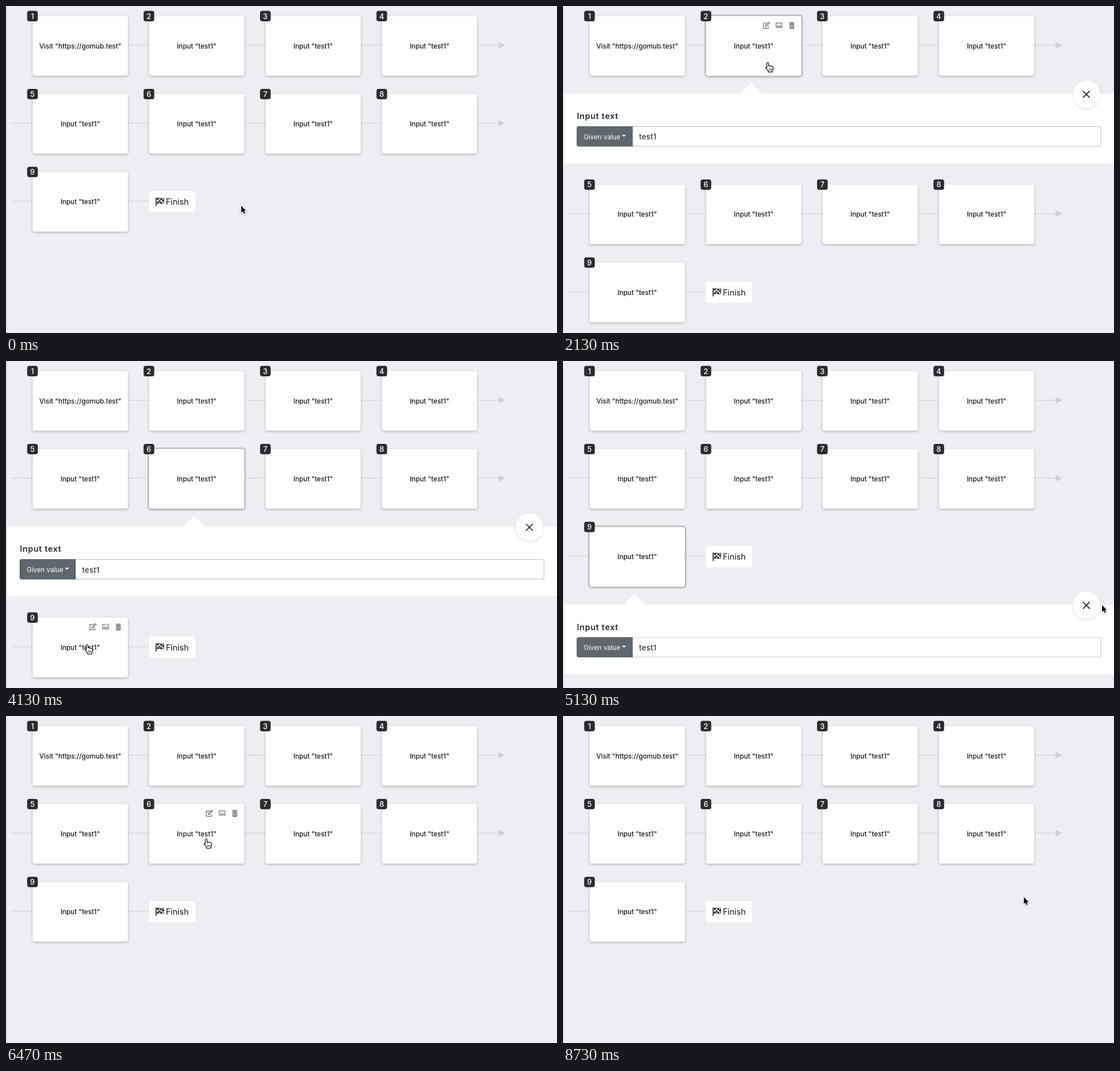
An HTML page with a canvas for the animation above (8.76 s loop, 972x576 px).

```html
<!DOCTYPE html>
<html lang="en">
<head>
<meta charset="utf-8">
<title>Step editor</title>
<style>
html, body { margin: 0; width: 972px; height: 576px; overflow: hidden; }
canvas { display: block; }
</style>
</head>
<body>
<canvas width="972" height="576"></canvas>
<script>
const ctx = document.querySelector('canvas').getContext('2d');
const LOOP = 8760, CLICK_DELAY = 200, CLOSED = -1;
const CARD_W = 168, CARD_H = 105, PITCH_X = 205.4, PITCH_Y = 137.3;
const PANEL_H = 123, PANEL_SHIFT = 159.5;
const INK = '#17181a', LINE = '#cfd0d3', ICON = '#6c6e71';
const FONT = 'Inter, "Open Sans", sans-serif';

// Pointer trips; `opens` is the card shown by the click that follows the trip.
const home = { x: 415, y: 352 };
const trips = [
  { start: 230, end: 530, x: 383, y: 331 },
  { start: 730, end: 1430, x: 346, y: 76, opens: 1 },
  { start: 1930, end: 2800, x: 330, y: 362, bend: 53, opens: 5 },
  { start: 3030, end: 4000, x: 143, y: 500, opens: 8 },
  { start: 4400, end: 5050, x: 951, y: 430 },
  { start: 5150, end: 5230, x: 932, y: 434, opens: CLOSED },
  { start: 5440, end: 6330, x: 353, y: 217, opens: 5 },
  { start: 6750, end: 7600, x: 922, y: 303, opens: CLOSED },
  { start: 7830, end: 8180, x: 751, y: 318 },
  { start: 8470, end: 8730, x: 813, y: 319 }
];

const arrow = new Path2D('M0 0V12L2.7 9.4L4.6 13.8L6.6 13L4.8 8.7H8.5Z');
const hand = new Path2D('M-1.4 8.5V1a1.5 1.5 0 0 1 3 0V5.5q1.6-1 2.9.3q1.9-.8 2.7.6q2.4-.2 2.4 1.8V11q0 1.6-1.5 3V16H1V14.2q-2.2-2.6-4.2-5.2q-.6-2 1.8-.5z');
const ease = u => u * u * u * (10 - 15 * u + 6 * u * u);

function pointerAt(t) {
  const i = trips.findLastIndex(trip => trip.start <= t);
  if (i < 0) return [home.x, home.y];
  const from = trips[i - 1] ?? home, to = trips[i];
  const s = ease(Math.min(1, (t - to.start) / (to.end - to.start)));
  const bulge = 4 * s * (1 - s) * (to.bend ?? 0);
  return [from.x + (to.x - from.x) * s + bulge, from.y + (to.y - from.y) * s];
}

function openCardAt(t) {
  const click = trips.findLast(trip => 'opens' in trip && trip.end + CLICK_DELAY <= t);
  return click ? click.opens : CLOSED;
}

function box(x, y, w, h, r, fill) {
  ctx.beginPath();
  ctx.roundRect(x, y, w, h, r);
  ctx.fillStyle = fill;
  ctx.fill();
}

function triangle(x, y, dx, dy, fill) {
  // Apex at x, y; the base lies dx, dy away and is perpendicular to the axis of the larger offset.
  ctx.beginPath();
  ctx.moveTo(x, y);
  ctx.lineTo(x + dx, y + dy);
  Math.abs(dx) > Math.abs(dy) && dx < 0 ? ctx.lineTo(x + dx, y - dy) : ctx.lineTo(x - dx, y + dy);
  ctx.fillStyle = fill;
  ctx.fill();
}

function text(str, x, y, size, color, { weight = 400, align = 'left', gap = 0 } = {}) {
  ctx.font = `${weight} ${size}px ${FONT}`;
  ctx.textAlign = align;
  ctx.letterSpacing = gap + 'px';
  ctx.fillStyle = color;
  ctx.fillText(str, x, y);
}

function stroke(path, color, width) {
  ctx.strokeStyle = color;
  ctx.lineWidth = width;
  ctx.stroke(typeof path === 'string' ? new Path2D(path) : path);
}

function at(x, y, draw) {
  ctx.save();
  ctx.translate(x, y);
  draw();
  ctx.restore();
}

function withShadow(draw, alpha = .26) {
  ctx.save();
  ctx.shadowColor = `rgba(0,0,0,${alpha})`;
  ctx.shadowBlur = 4;
  ctx.shadowOffsetY = 1.5;
  draw();
  ctx.restore();
}

function dashes(x1, x2, y) {
  ctx.save();
  ctx.setLineDash([3.5, 2]);
  stroke(`M${x1} ${y}H${x2}`, LINE, 1.6);
  ctx.restore();
}

function drawTools(x, y) {
  at(x + 100, y + 10, () => stroke('M7.5 2.2H1V11.5H9.8V8M4.5 8.3L5 6.3L10.5.8L12 2.3L6.5 7.8Z', ICON, 1.2));
  at(x + 123, y + 11.5, () => {
    stroke('M.6.6H10.9V8.4H.6Z', ICON, 1.2);
    stroke('M2 6.6L4 5L5 5.8L7.5 3.6L9.6 6.6ZM2.6 2.6h.8', ICON, .9);
  });
  at(x + 146.4, y + 10.5, () => {
    box(0, 1, 9.6, 1.4, .5, ICON);
    box(3, 0, 3.6, 1.4, .5, ICON);
    box(.8, 3.2, 8, 8.8, 1, ICON);
    for (let i = 0; i < 3; i++) box(2.4 + i * 2, 4.8, .8, 5.6, 0, '#fff');
  });
}

function drawCard(i, x, y, selected, hovered) {
  withShadow(() => box(x, y, CARD_W, CARD_H, 4, '#fff'));
  if (selected) {
    box(x - 2.7, y - 2.7, CARD_W + 5.4, CARD_H + 5.4, 6, '#bdbebf');
    box(x, y, CARD_W, CARD_H, 3, '#fff');
  }
  const label = i ? 'Input "test1"' : 'Visit "https://gomub.test"';
  text(label, x + CARD_W / 2, y + 56.7, 11.8, INK, { weight: 500, align: 'center' });
  if (hovered) drawTools(x, y);
  box(x - 9.7, y - 9.2, 18.8, 18.4, 4, '#2b2c2e');
  text(i + 1, x - .4, y + 4.7, 13, '#fff', { weight: 500, align: 'center' });
}

function drawFinish(x, y) {
  box(x, y, 81.5, 37.5, 4, '#fff');
  at(x + 11.8, y + 11.3, () => {
    box(0, 0, 1.6, 15, .8, INK);
    for (let c = 0; c < 4; c++)
      for (let r = 0; r < 3; r++)
        if ((c + r) % 2 === 0) box(2.6 + c * 2.9, 1.7 + r * 2.8 + Math.sin(c * 1.5) * .6, 2.9, 2.8, 0, INK);
    stroke('M2 1.5Q5 .4 8 1.5T14.2 1.2V9.8Q11.5 11.2 8.5 10T2 10.3', INK, 1);
  });
  text('Finish', x + 29.7, y + 24.4, 14.5, INK);
}

function drawPanel(y, col, closeHover) {
  box(2, y, 970, PANEL_H, 0, '#fff');
  triangle(126.4 + col * PITCH_X, y - 18.5, 20, 19, '#fff');
  text('Input text', 24.5, y + 44.5, 14.5, '#2a2c2f', { weight: 600, gap: .7 });

  box(24, y + 57.3, 925.7, 35.7, 4, '#c6c8ca');
  box(25, y + 58.5, 923.5, 33.3, 3, '#fff');
  box(24, y + 57.3, 99, 35.7, [4, 0, 0, 4], '#5f676d');
  text('Given value', 36.5, y + 80, 11.7, '#fff');
  triangle(107.5, y + 76, 3.5, -3.5, '#fff');
  text('test1', 134.3, y + 80.7, 13, '#303438', { weight: 500, gap: .4 });

  at(923.3, y + 1, () => {
    withShadow(() => box(-24.4, -24.4, 48.8, 48.8, 24.4, closeHover ? '#b7b8b9' : '#fff'), .13);
    stroke('M-6-5.8L6 6.2M6-5.8L-6 6.2', '#202124', 1.7);
  });
}

function drawPointer(x, y, kind) {
  at(x, y, () => {
    ctx.lineJoin = 'round';
    if (kind === 'text') {
      const beam = 'M-3-7.5Q0-7.5 0-5.5Q0-7.5 3-7.5M0-5.5V5.5M-3 7.5Q0 7.5 0 5.5Q0 7.5 3 7.5';
      stroke(beam, '#fff', 2.4);
      stroke(beam, '#222', 1.1);
    } else if (kind === 'hand') {
      withShadow(() => { ctx.fillStyle = '#fff'; ctx.fill(hand); });
      stroke(hand, '#111', 1.2);
      stroke('M2.6 10V13.3M4.7 10V13.3M6.8 10V13.3', '#111', .9);
    } else {
      withShadow(() => stroke(arrow, '#fff', 1.6));
      ctx.fillStyle = '#000';
      ctx.fill(arrow);
    }
  });
}

function draw(t) {
  const [px, py] = pointerAt(t);
  const open = openCardAt(t), openRow = open >> 2;
  const rowY = r => 17.8 + r * PITCH_Y + (open !== CLOSED && r > openRow ? PANEL_SHIFT : 0);
  const inside = (x, y, w, h) => px >= x && px <= x + w && py >= y && py <= y + h;
  let kind = 'arrow';

  box(0, 0, 972, 576, 0, '#edeef2');
  box(1, 0, 1, 576, 0, '#dcdde0');

  for (let r = 0; r < 3; r++) {
    const y = rowY(r) + 51.3;
    if (r) dashes(10, 46, y);
    for (let c = 0; c < (r < 2 ? 4 : 1); c++) {
      const x = 48 + c * PITCH_X + CARD_W;
      dashes(x, x + 36.5, y);
    }
    if (r < 2) triangle(881, y, -12, 5.8, LINE);
  }

  for (let i = 0; i < 9; i++) {
    const x = 47 + i % 4 * PITCH_X, y = rowY(i >> 2);
    const hovered = inside(x, y, CARD_W, CARD_H);
    if (hovered) kind = 'hand';
    drawCard(i, x, y, i === open, hovered);
  }
  drawFinish(252.2, rowY(2) + 33.6);

  if (open !== CLOSED) {
    const y = rowY(openRow) + 136.7;
    const closeHover = Math.hypot(px - 923.3, py - y - 1) < 24.4;
    if (closeHover || inside(24, y + 57, 99, 36)) kind = 'hand';
    else if (inside(123, y + 57, 827, 36)) kind = 'text';
    drawPanel(y, open % 4, closeHover);
  }
  drawPointer(px, py, kind);
}

const start = performance.now();
function tick() {
  draw((performance.now() - start) % LOOP);
  requestAnimationFrame(tick);
}
tick();
</script>
</body>
</html>
```
